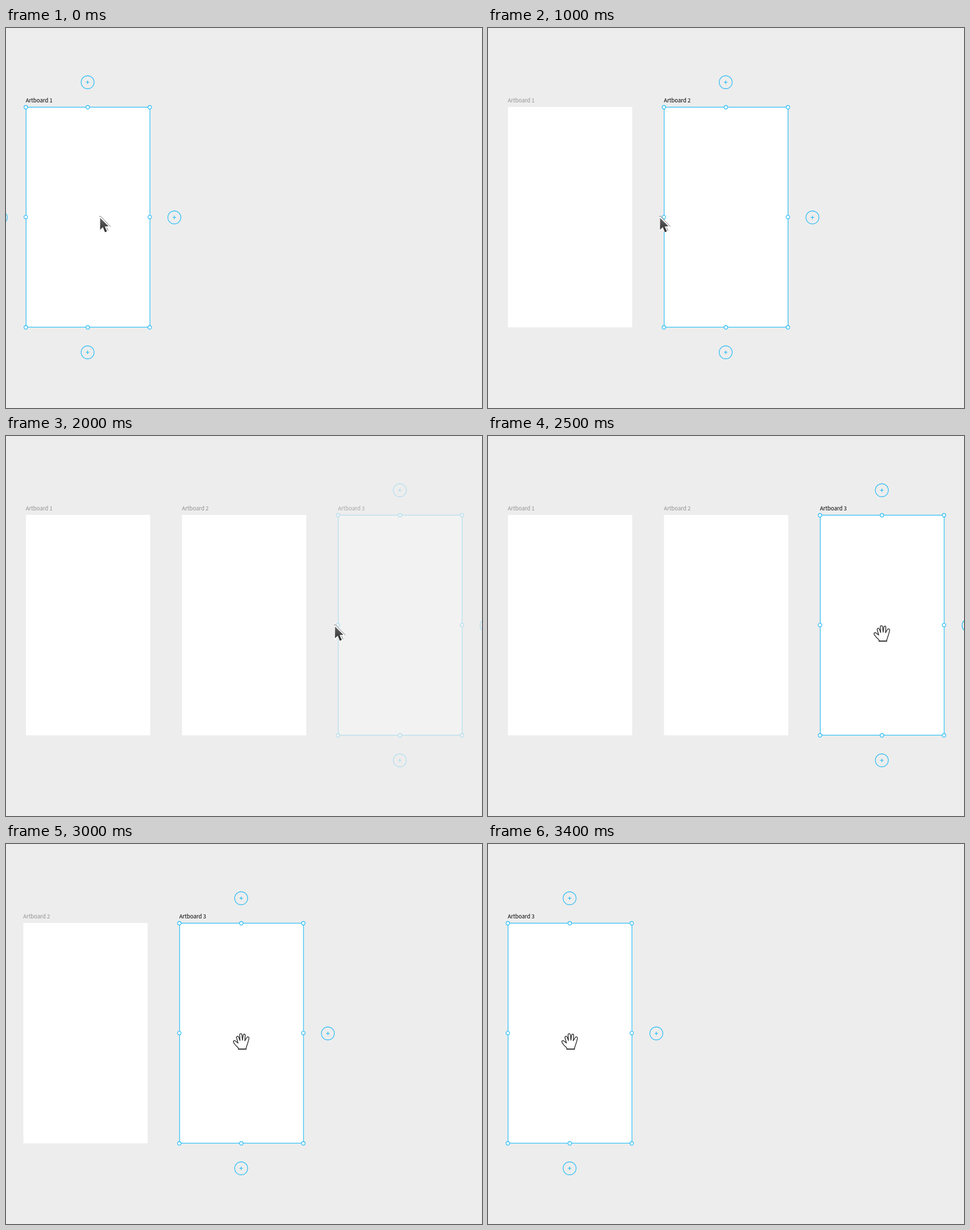
An HTML page that plays this animation: 837x669 px, repeating every 3.5 s.

```html
<!DOCTYPE html>
<html lang="en">
<head>
<meta charset="utf-8">
<title>Artboards</title>
<style>
  html, body { margin: 0; width: 100%; height: 100%; overflow: hidden; background: #ededed; }
  svg { display: block; width: 837px; height: 669px; }
  text {
    font: 500 9.6px "Noto Sans CJK SC", "Noto Sans CJK JP", "Noto Sans CJK", "Open Sans", sans-serif;
    fill: #929292;
  }
  .selected text { fill: #000; }
  .tools { fill: none; stroke: #1ab8f5; stroke-width: 1.1; visibility: hidden; }
  .selected .tools { visibility: visible; }
  .knob { fill: #fff; }
</style>
</head>
<body>
<svg viewBox="0 0 837 669">
  <defs>
    <linearGradient id="shade" x1="0" y1="0" x2="0" y2="1">
      <stop offset="0" stop-color="#666"/>
      <stop offset="1" stop-color="#2b2b2b"/>
    </linearGradient>
  </defs>
  <g id="world">
    <g id="boards"></g>
    <g id="arrow">
      <path d="M.5 .5H2.5L20 19L13.5 19.5L17 27L10 30.2L6.3 22.5L.5 27.5Z" fill="#fff"/>
      <path d="M0 .6H2.6L19.8 18.8M13 20L15.6 26" fill="none" stroke="#777"/>
      <path d="M1.5 3.2V24.3L6.3 19.6L10.1 28.6L13.5 27.1L9.7 18.4L16.2 17.9Z" fill="url(#shade)"/>
    </g>
    <g id="hand" transform="translate(678 333)" stroke="#333" stroke-linejoin="round">
      <path fill="#fff" stroke-width="1.4" d="M9.5 28V26L5 21.5C3 19 .8 17 .8 15C.8 13 3.2 12.6 5 14.2L9 17.5
        L6.5 8.5C5.6 5.8 8.8 4 10 6.8L12.5 13L11.8 3.5C11.6 .2 15.4 0 15.8 3.2L16.8 12.3
        L18 3.8C18.4 .8 21.8 1.2 21.6 4.4L21 13.5L24.2 8C25.8 5.4 28.8 6.6 28.2 9.6
        C27.4 13.5 26.2 17 25.2 20L23.2 26V28"/>
      <path d="M9 28.1H23.7" stroke-width="2"/>
    </g>
  </g>
</svg>
<script>
  const LOOP = 3500, STEP = 100, GAP = 274.5;
  const $ = id => document.getElementById(id);

  const knob = (x, y) => `<circle class="knob" cx="${x}" cy="${y}" r="3.1"/>`;
  const adder = (x, y) =>
    `<circle cx="${x}" cy="${y}" r="11.4"/><path d="M${x - 3} ${y}h6M${x} ${y - 3}v6"/>`;

  function board(i) {
    let knobs = "";
    for (const x of [34.8, 143.8, 252.8])
      for (const y of [139.5, 332.8, 527])
        if (x !== 143.8 || y !== 332.8) knobs += knob(x, y);
    const adders = [[143.5, 95.5], [296, 333.5], [143.5, 571]];
    if (i === 0) adders.push([-9, 333.5]);
    return `<g transform="translate(${i * GAP} 0)">
      <rect x="35" y="139" width="218.5" height="388" fill="#fff"/>
      <text x="34.7" y="131">Artboard ${i + 1}</text>
      <g class="tools">
        <rect x="35.3" y="139.4" width="217.8" height="387.3"/>
        ${knobs}${adders.map(p => adder(...p)).join("")}
      </g></g>`;
  }

  $("boards").innerHTML = [0, 1, 2].map(board).join("");
  const boards = [...$("boards").children];

  // Piecewise linear value through [time, value] points.
  function track(points, t) {
    const n = points.findIndex(p => p[0] > t);
    if (n === 0) return points[0][1];
    if (n < 0) return points[points.length - 1][1];
    const [t0, a] = points[n - 1], [t1, b] = points[n];
    return a + (b - a) * (t - t0) / (t1 - t0);
  }

  const arrowX = [[0, 164], [300, 301], [1100, 301], [1500, 577], [2200, 577], [2500, 692]];
  const arrowY = [[0, 331], [1100, 331], [1500, 332]];
  const scroll = [[2600, 0], [3000, 279], [3200, 426.5], [3300, 496], [3400, 549]];
  const fadeIn = start => [[start - 100, 0], [start, .3], [start + 100, .65], [start + 200, 1]];
  const shown = [[[0, 1]], fadeIn(800), fadeIn(2000)];

  function draw(time) {
    const t = Math.floor(time % LOOP / STEP) * STEP;
    const active = t < 800 ? 0 : t < 2000 ? 1 : 2;
    boards.forEach((b, i) => {
      b.setAttribute("opacity", track(shown[i], t));
      b.classList.toggle("selected", i === active);
    });
    $("world").setAttribute("transform", `translate(${-track(scroll, t)} 0)`);
    $("arrow").setAttribute("transform", `translate(${track(arrowX, t)} ${track(arrowY, t)})`);
    const grabbing = t >= 2500;
    $("arrow").style.display = grabbing ? "none" : "";
    $("hand").style.display = grabbing ? "" : "none";
  }

  function tick() {
    draw(performance.now());
    requestAnimationFrame(tick);
  }
  tick();
</script>
</body>
</html>
```
